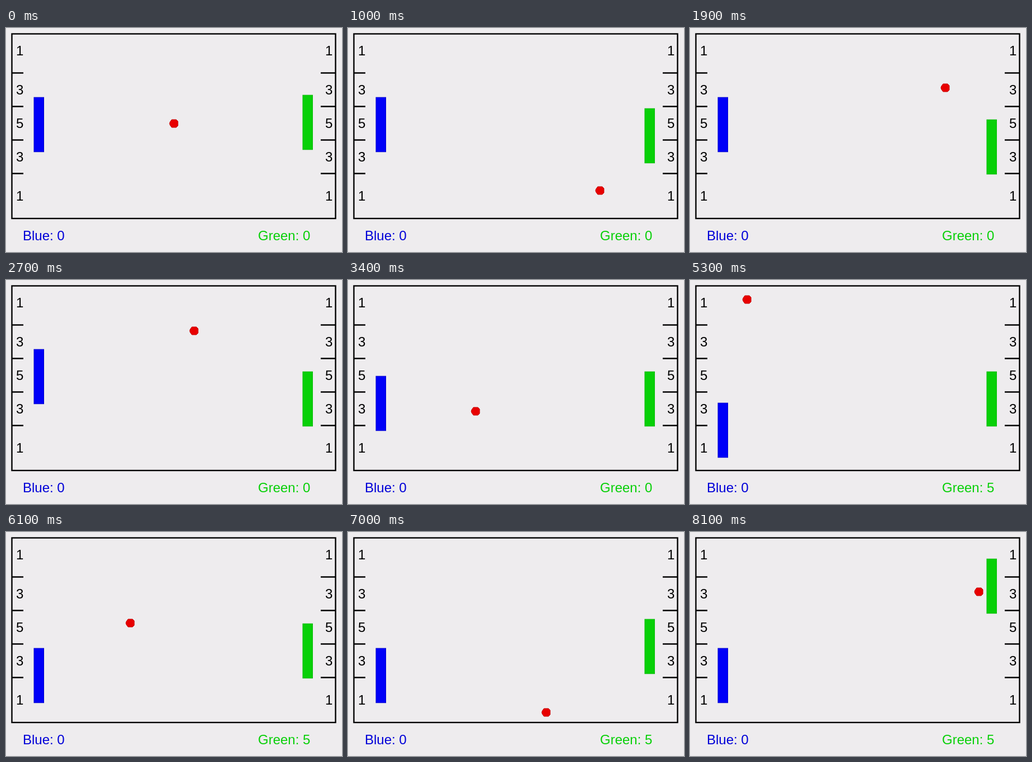
These frames come from a looping animation (600 by 401 pixels, 8200 ms). An HTML page:

```html
<!DOCTYPE html>
<html lang="en">
<head>
<meta charset="utf-8">
<title>Paddle game</title>
<style>
  html, body { margin: 0; width: 100%; height: 100%; overflow: hidden; background: #eeecee; }
  svg { display: block; width: 100%; height: 100%; }
  text { font: 24px "Liberation Sans", Arial, sans-serif; }
</style>
</head>
<body>
<svg viewBox="0 0 600 401">
  <rect width="600" height="401" fill="#eeecee"/>
  <g id="court">
    <rect x="10.5" y="10.5" width="578" height="330.5" fill="none" stroke="#000" stroke-width="2.4"/>
  </g>
  <text x="30" y="380" fill="#0000d8">Blue: 0</text>
  <text x="450" y="380" fill="#08d008">Green: <tspan id="score">0</tspan></text>
  <rect id="blue" x="50" width="17.5" height="97.5" fill="#0000f8" stroke="#0000d0"/>
  <rect id="green" x="530" width="17.5" height="97.5" fill="#08d008" stroke="#08bc08"/>
  <path id="ball" d="M-4-7H4L7-4V4L4 7H-4L-7 3-8 0-7-3Z" fill="#e80000" stroke="#c80000"/>
</svg>
<script>
const LOOP = 8200, STEP = 100;
const el = id => document.getElementById(id);
const court = el("court"), ball = el("ball"), blue = el("blue"), green = el("green"), score = el("score");

function add(tag, attrs, text = "") {
  const node = document.createElementNS("http://www.w3.org/2000/svg", tag);
  for (const key in attrs) node.setAttribute(key, attrs[key]);
  node.textContent = text;
  court.append(node);
}

// Goal zones: the middle one scores most, the outer ones are taller
for (let i = 0; i < 5; i++) {
  const points = 5 - 2 * Math.abs(i - 2);
  const y = 179 + 60 * (i - 2) + (i === 0 ? -10 : i === 4 ? 10 : 0);
  for (const x of [18, 570]) add("text", { x, y }, points);
  if (i === 4) break;
  const line = 80.5 + 60 * i;
  add("path", { d: `M10 ${line}H31M562 ${line}H589`, stroke: "#000", "stroke-width": 2.3 });
}

// Reflects a distance between two walls
function bounce(pos, min, max) {
  const span = max - min;
  const d = (pos - min) % (2 * span);
  return min + (d > span ? 2 * span - d : d);
}

// Steady paddle move between two ticks, in whole 4 px steps
function slide(tick, from, to, distance) {
  const part = Math.min(1, Math.max(0, (tick - from) / (to - from)));
  return Math.round(part * distance / 4) * 4;
}

function draw(ms) {
  const n = Math.floor(ms % LOOP / STEP);
  // About 2.5 game ticks per picture, with a slow drift
  const tick = Math.floor(2.5 * n + 1.6 - Math.cos(Math.PI * n / 60));
  const x = bounce(300 + 6 * tick, 18, 522);
  const y = bounce(171 + 8 * tick, 19, 331);
  ball.setAttribute("transform", `translate(${x} ${y})`);
  blue.setAttribute("y", 124.2 + slide(tick, 74, 104, 120) + slide(tick, 109, 115, -24) + slide(tick, 142, 145, -12));
  green.setAttribute("y", 120.2 + slide(tick, 16, 33, 44) + slide(tick, 175, 177, -8) + slide(tick, 182, 204, -108));
  score.textContent = tick >= 121 ? 5 : 0;
}

const start = performance.now();
function loop() {
  draw(performance.now() - start);
  requestAnimationFrame(loop);
}
loop();
</script>
</body>
</html>
```
